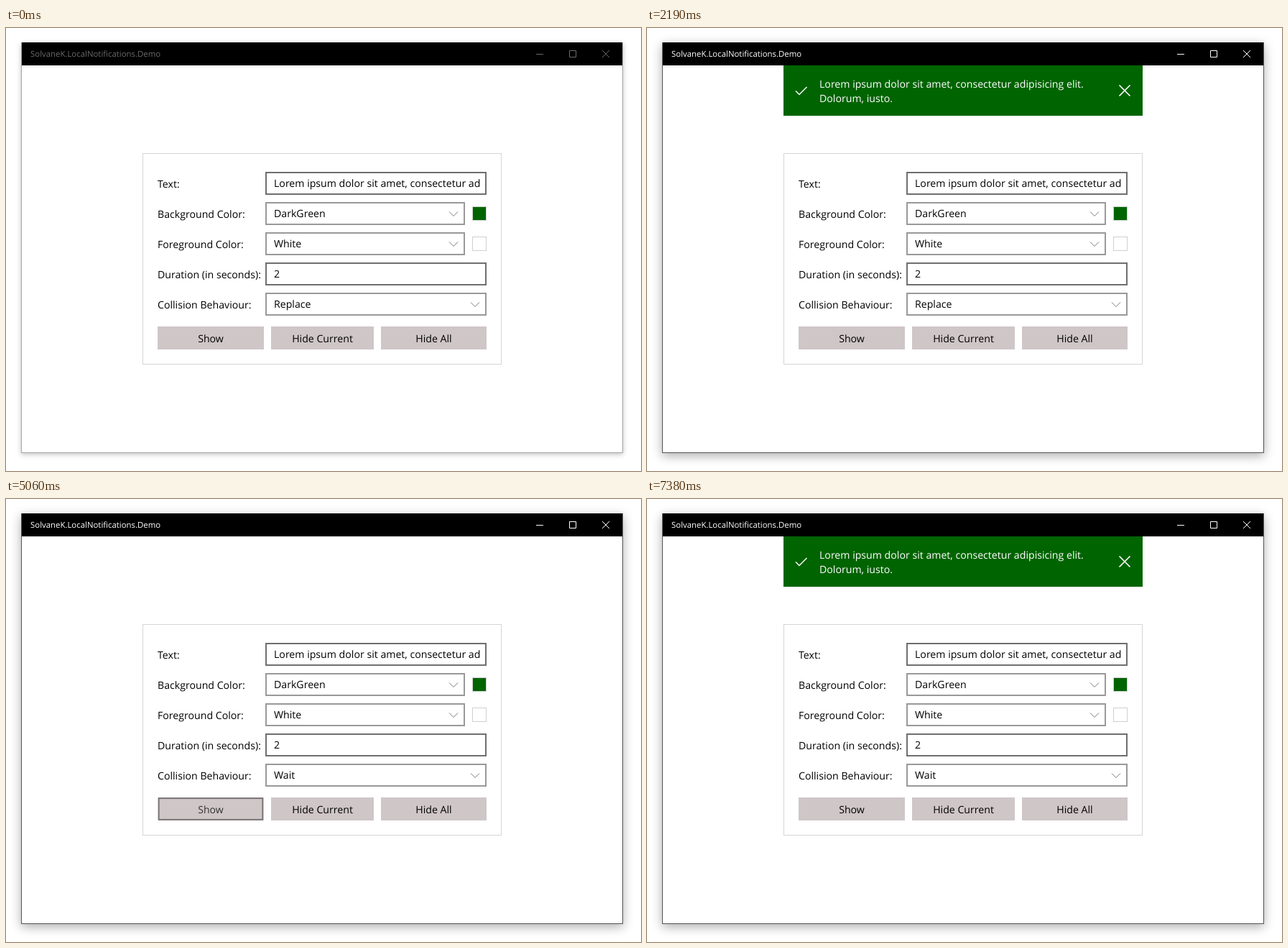
Write an HTML page that moves like this. It is 884x616 px and loops after 8000 ms.

```html
<!DOCTYPE html>
<html lang="en">
<head>
<meta charset="utf-8">
<title>Local notifications demo</title>
<style>
html, body { margin: 0; width: 100%; height: 100%; overflow: hidden; background: #fff; }
#win {
  position: absolute; left: 21px; top: 20px; width: 838px; height: 571px;
  box-sizing: border-box; border: 1px solid #a6a6a6; background: #fff;
  box-shadow: 0 2px 7px rgba(0, 0, 0, .24);
}
#win.active { border-color: #555; box-shadow: 0 4px 14px rgba(0, 0, 0, .32); }
svg { position: absolute; left: 0; top: 0; }
text { font: 14.15px "Open Sans", "Noto Sans", sans-serif; text-rendering: geometricPrecision; white-space: pre; }
#caption { color: #6b6b6b; }
#caption.active { color: #fff; }
#caption text { font-size: 11.4px; fill: currentColor; }
.line { fill: none; stroke: currentColor; }
.mid { text-anchor: middle; }
.white { fill: #fff; }
</style>
</head>
<body>
<div id="win"></div>
<svg width="884" height="616" viewBox="0 0 884 616">
  <clipPath id="client"><rect x="22" y="52" width="836" height="538"/></clipPath>
  <clipPath id="split"><rect id="splitBox" x="361" width="308"/></clipPath>

  <rect x="22" y="20" width="836" height="32"/>
  <g id="caption">
    <text x="34" y="40">SolvaneK.LocalNotifications.Demo</text>
    <path class="line" d="M738 36.5h10M784.5 31.5h9v9h-9zM830 31l10 10m0-10l-10 10"/>
  </g>

  <rect x="190.5" y="174.5" width="499" height="293" fill="none" stroke="#d6d6d6"/>
  <g id="form"></g>

  <g id="show">
    <rect x="211" y="415" width="148" height="32" fill="#cfc6c8"/>
    <rect id="ring" x="212" y="416" width="146" height="30" fill="none" stroke="#7b7577" stroke-width="2"/>
    <text id="showText" class="mid" x="285" y="437">Show</text>
  </g>

  <g id="popup" clip-path="url(#split)">
    <rect x="361.5" y="328.5" width="307" height="79" fill="#fdfbfc" stroke="#ccc8c9"/>
    <g id="wait">
      <rect id="waitBg" x="362" y="336" width="306" height="32"/>
      <text x="373" y="357">Wait</text>
    </g>
    <rect x="362" y="368" width="306" height="32" fill="#a3a3a3"/>
    <text x="373" y="389">Replace</text>
  </g>

  <g clip-path="url(#client)">
    <g id="toast">
      <rect x="190" y="52" width="500" height="70" fill="#006400"/>
      <path class="line" color="#fff" stroke-width="1.4" d="M207 87.5l5 5l10.500-10.500"/>
      <path class="line" color="#fff" stroke-width="1.6" d="M657.500 79.500l15 15m0-15l-15 15"/>
      <text class="white" x="240" y="83">Lorem ipsum dolor sit amet, consectetur adipisicing elit.</text>
      <text class="white" x="240" y="103">Dolorum, iusto.</text>
    </g>
  </g>
</svg>
<script>
const $ = id => document.getElementById(id);
const LOOP = 8000, HEIGHT = 70, SLIDE = 125, PRESS = 200;

// label, value, field width, is a combo box, swatch colour
const rows = [
  ['Text:', 'Lorem ipsum dolor sit amet, consectetur ad', 308],
  ['Background Color:', 'DarkGreen', 278, true, '#006400'],
  ['Foreground Color:', 'White', 278, true, '#fff'],
  ['Duration (in seconds):', '2', 308],
  ['Collision Behaviour:', 'Replace', 308, true]
];
const field = ([label, value, w, combo, swatch], i) => {
  const y = 200 + 42 * i;
  return `<text x="211" y="${y + 22}">${label}</text>
    <rect id="box${i}" x="362" y="${y + 1}" width="${w - 2}" height="30" fill="#fff"
      stroke="${combo ? '#999' : '#716e6e'}" stroke-width="2"/>
    <text id="value${i}" x="373" y="${y + 21}">${value}</text>` +
    (combo ? `<path class="line" color="#777" d="M${339 + w} ${y + 55 - 42 + .5}l6 6l6-6"/>` : '') +
    (swatch ? `<rect x="649.5" y="${y + 6.5}" width="19" height="19" fill="${swatch}" stroke="#d0d0d0"/>` : '');
};
const button = (x, w, label) =>
  `<rect x="${x}" y="415" width="${w}" height="32" fill="#cfc6c8"/>
   <text class="mid" x="${x + w / 2}" y="437">${label}</text>`;
$('form').innerHTML = rows.map(field).join('') +
  button(369, 143, 'Hide Current') + button(522, 147, 'Hide All');

const clamp = x => Math.max(0, Math.min(1, x));
const easeOut = x => Math.sin(clamp(x) * Math.PI / 2);
const within = (t, spans) => spans.some(([a, b]) => t >= a && t < b);

const hovers = [[60, 2190], [4570, 6400]];
const presses = [[460, 740], [1300, 1553], [5000, 5076], [5520, 5830]];
// start time and whether the banner enters
const slides = [[800, true], [1553, false], [1672, true], [3592, false],
                [5076, true], [7115, false], [7250, true]];

function pressAmount(t) {
  const p = presses.findLast(([down]) => t >= down);
  if (!p) return 0;
  return easeOut((Math.min(t, p[1]) - p[0]) / PRESS) * (1 - clamp((t - p[1]) / PRESS));
}

function toastOffset(t) {
  const s = slides.findLast(([start]) => t >= start);
  if (!s) return -HEIGHT;
  const k = easeOut((t - s[0]) / SLIDE);
  return -HEIGHT * (s[1] ? 1 - k : k);
}

const scaleAt = (x, y, k) => `translate(${x} ${y}) scale(${k}) translate(${-x} ${-y})`;

function drawPopup(t) {
  const open = t < 4290 ? easeOut((t - 3730) / 130) : 1 - clamp((t - 4290) / 50);
  $('popup').style.display = open > 0 ? '' : 'none';
  // the list unfolds from the selected row
  const top = 368 - 40 * open, bottom = 400 + 8 * open;
  $('splitBox').setAttribute('y', top);
  $('splitBox').setAttribute('height', bottom - top);
  const held = clamp((t - 4190) / 60);
  $('waitBg').setAttribute('fill', t < 4020 ? 'none' : held ? '#c0c0c0' : '#e4e2e3');
  $('wait').setAttribute('transform', scaleAt(362, 352, 1 - .01 * held));
  $('box4').setAttribute('stroke', within(t, [[3680, 4340]]) ? '#666' : '#999');
  $('value4').textContent = t < 4290 ? 'Replace' : 'Wait';
}

function draw(t) {
  const active = t >= 460;
  $('win').classList.toggle('active', active);
  $('caption').classList.toggle('active', active);
  const p = pressAmount(t);
  $('ring').style.display = within(t, hovers) ? '' : 'none';
  $('show').setAttribute('transform', scaleAt(285, 431, 1 - .02 * p));
  $('showText').setAttribute('fill', p > .1 ? '#333' : '#000');
  $('toast').setAttribute('transform', `translate(0 ${toastOffset(t)})`);
  drawPopup(t);
}

const begin = performance.now();
function tick() {
  draw((performance.now() - begin) % LOOP);
  requestAnimationFrame(tick);
}
tick();
</script>
</body>
</html>
```
